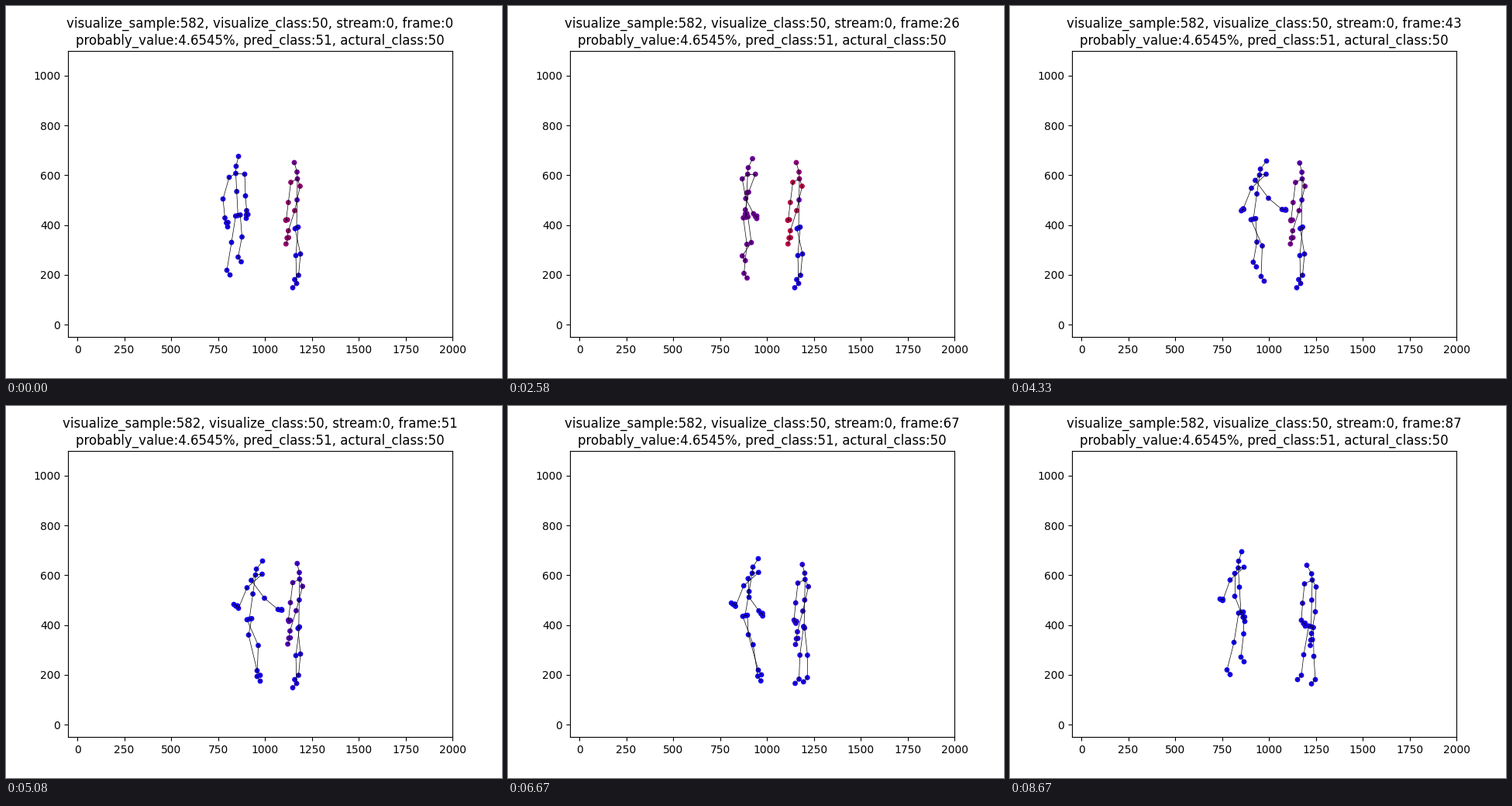
Write a matplotlib script that moves like this. It is 640x480 px and loops after 8760 ms.

```python
import numpy as np
import matplotlib.pyplot as plt
from matplotlib.animation import FuncAnimation
from matplotlib.collections import LineCollection
from matplotlib.transforms import Affine2D

WIDTH, HEIGHT, DPI = 640, 480, 100
LOOP_MS, STEP_MS = 8760, 40
TICK_MS = 1000 / 12        # playback rate; every sixth tick repeats a pose
LAST_POSE = 87

# Joint order: head, neck, chest, mid, base, two arms of 6, two legs of 4
ARMS, LEGS = (5, 11), (17, 21)
BONES = [(i, i + 1) for i in range(4)]
for arm in ARMS:
    BONES += [(2, arm), (arm, arm + 1), (arm + 1, arm + 2),
              (arm + 2, arm + 3), (arm + 3, arm + 5), (arm + 5, arm + 4)]
for leg in LEGS:
    BONES += [(4, leg), (leg, leg + 1), (leg + 1, leg + 2), (leg + 2, leg + 3)]


def pose(**parts):
    """Key points in stage pixels, y down; shoulder and hip are half-widths."""
    return {name: np.array(p, float) for name, p in parts.items()}


def blend(n, first, moves):
    """Add up the moves; each part may have its own (start, end, power)."""
    result, before = dict(first), first
    for after, timing, own_timing in moves:
        for part in first:
            start, end, power = own_timing.get(part, timing)
            u = np.clip((n - start) / (end - start), 0, 1) ** power
            result[part] = result[part] + u * (after[part] - before[part])
        before = after
    return result


def skeleton(p, girdle, toe):
    """Fill in all 25 joints from the key points."""
    head, chest, base = p["head"], p["chest"], p["base"]
    neck = chest + (head - chest) * (0.12, 0.42)
    joints = [head, neck, chest, chest + 0.43 * (base - chest), base]
    for side, arm in ((1, p["arm_a"]), (-1, p["arm_b"])):
        elbow, wrist, tip = arm
        hand = wrist + 0.55 * (tip - wrist)
        joints += [chest + girdle + side * p["shoulder"],
                   elbow, wrist, hand, tip, hand + (2, -0.5)]
    for side, knee, ankle in zip((1, -1), p["knees"], p["ankles"]):
        joints += [base + side * p["hip"], knee, ankle, ankle + toe]
    return np.array(joints)


# Left figure: stands, steps in and strikes, plants the foot, withdraws
stand = pose(head=(300, 194), chest=(296.5, 216), base=(299.3, 270.3),
             shoulder=(-10, 2), hip=(-3, 0.7),
             arm_a=[(280, 249), (282.5, 273.5), (286, 285)],
             arm_b=[(309, 245), (310.5, 264), (310, 274)],
             knees=[(291, 305), (304.5, 298)],
             ankles=[(285, 341), (299.5, 324)])
strike = pose(head=(331, 200), chest=(322, 218), base=(314, 275),
              shoulder=(-7, 4), hip=(-3, 0.7),
              arm_a=[(333.5, 248), (351, 262.5), (356, 263.5)],
              arm_b=[(312, 235.5), (302, 262), (302.5, 271.5)],
              knees=[(325.5, 310), (323.5, 312.5)],
              ankles=[(324, 349), (305, 321)])
planted = strike | pose(arm_b=[(311, 234.5), (300, 261), (294, 256)],
                        knees=[(325.5, 309), (313, 295.5)],
                        ankles=[(324, 349), (324, 341.5)])
withdrawn = pose(head=(299, 188), chest=(294.5, 209), base=(298, 266.5),
                 shoulder=(-6, 4), hip=(-3, 0.7),
                 arm_a=[(290, 245.5), (298, 266), (303, 278)],
                 arm_b=[(284, 224.5), (274.5, 251), (271, 249)],
                 knees=[(289, 305), (301.5, 294)],
                 ankles=[(280, 340.5), (298, 324)])
LEFT_MOVES = [
    (strike, (16, 36, 1), {}),
    (planted, (36, 51, 1), {}),
    (withdrawn, (51, 87, 1.7), {"base": (51, 78, 1.3), "arm_a": (51, 82, 1),
                                "ankles": (51, 87, 4)}),
]

# Right figure: holds still, then turns and steps back
guard = pose(head=(372, 202), chest=(376, 223), base=(375, 286.3),
             shoulder=(-6, -2.5), hip=(2, -1),
             arm_a=[(364.3, 253.5), (361.5, 276), (361, 276.5)],
             arm_b=[(372.5, 264), (364.3, 290), (361.3, 307)],
             knees=[(374, 322), (380, 320)],
             ankles=[(375, 358), (377.5, 347.5)])
turned = pose(head=(383, 205.5), chest=(390, 224.5), base=(388.5, 284.8),
              shoulder=(-7.5, -2), hip=(-3, -1),
              arm_a=[(377.5, 254.5), (376, 276.5), (381, 284)],
              arm_b=[(394, 265.5), (389, 293.5), (387.5, 309)],
              knees=[(379, 321), (392, 323)],
              ankles=[(376, 347.5), (394, 353)])
RIGHT_MOVES = [
    (turned, (36, 87, 1.3), {"head": (36, 80, 1), "arm_b": (36, 87, 2),
                             "knees": (59, 74, 1), "ankles": (59, 74, 1)}),
]

# How strongly each joint of the right figure reddens: spine, arms, legs
RIGHT_WEIGHT = np.repeat([0.7, 0.4, 0, 1, 0], [3, 1, 1, 12, 8])


def swell(n, centre, width):
    return np.exp(-((n - centre) / width) ** 2)


def figures(n):
    """Joints and redness of both figures."""
    left = skeleton(blend(n, stand, LEFT_MOVES), girdle=(1.5, 3), toe=(4, 6))
    right = skeleton(blend(n, guard, RIGHT_MOVES), girdle=(-2.5, 7), toe=(-5, 5.5))
    left_red = np.full(25, 0.07 + 0.36 * swell(n, 23, 14))
    right_red = 0.1 + 0.68 * RIGHT_WEIGHT * swell(n, 18, 30)
    return (left, right), np.concatenate([left_red, right_red])


fig, ax = plt.subplots(figsize=(WIDTH / DPI, HEIGHT / DPI), dpi=DPI)
ax.set_xlim(-50, 2000)
ax.set_ylim(-50, 1100)
title = ax.set_title("")

stage = Affine2D().scale(1, -1).translate(0, HEIGHT)
dots = ax.scatter([0] * 50, [0] * 50, s=15, transform=stage)
lines = LineCollection([], colors="black", linewidths=0.5, zorder=2,
                       transform=stage)
ax.add_collection(lines, autolim=False)


def pose_number(ms):
    tick = int((ms + 4) / TICK_MS)
    return min(tick - (tick + 3) // 6, LAST_POSE)


def draw(step):
    n = pose_number(step * STEP_MS + 30)
    bodies, red = figures(n)
    dots.set_offsets(np.concatenate(bodies))
    dots.set_color(np.column_stack([red, 0 * red, 1 - red]))
    lines.set_segments([body[[a, b]] for body in bodies for a, b in BONES])
    title.set_text(
        f"visualize_sample:582, visualize_class:50, stream:0, frame:{n}\n"
        "probably_value:4.6545%, pred_class:51, actural_class:50")
    return dots, lines, title


anim = FuncAnimation(fig, draw, frames=LOOP_MS // STEP_MS, interval=STEP_MS,
                     repeat=True, repeat_delay=0, blit=False)
plt.show()
```
